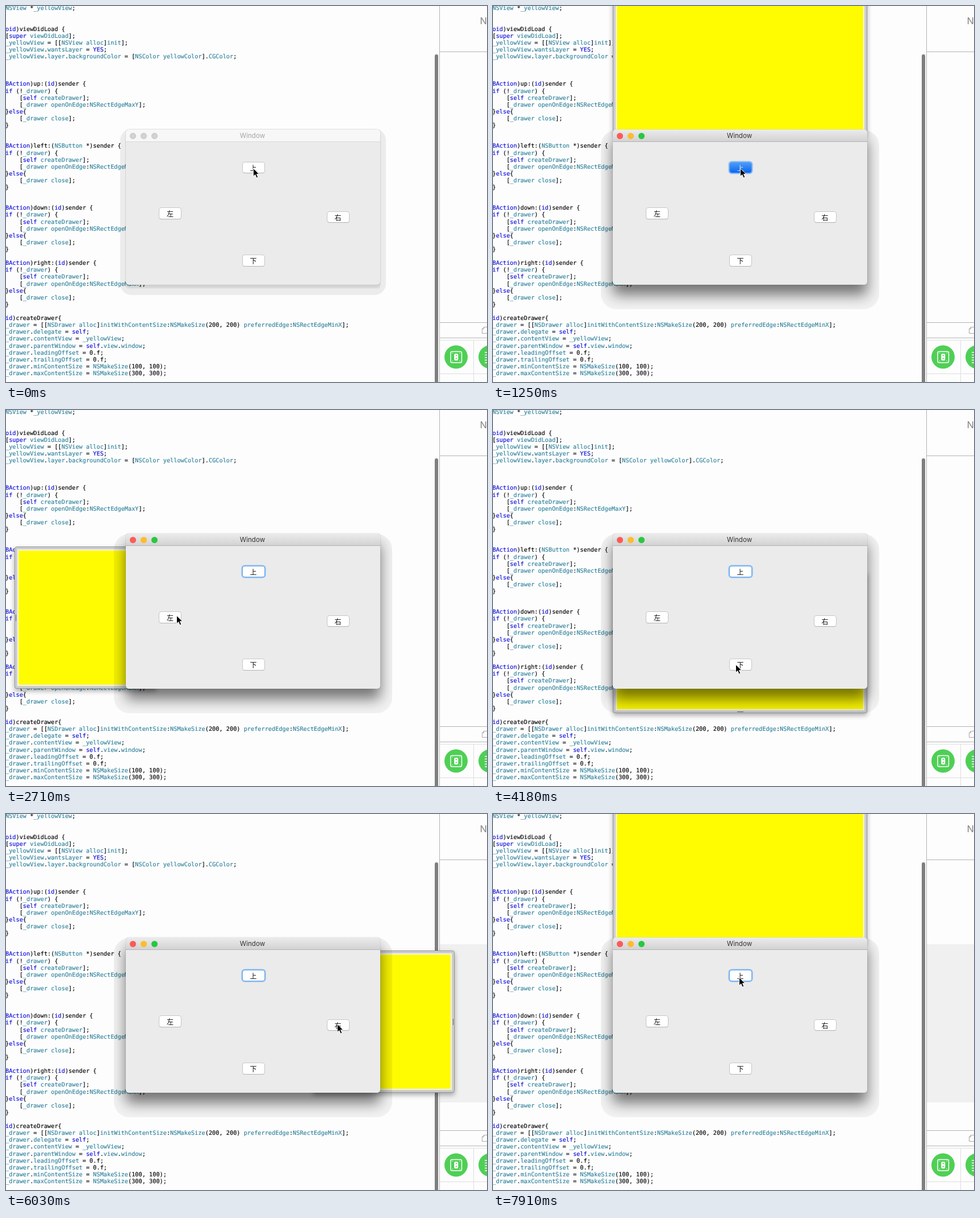
Animation, 847 px wide and 661 px high, one loop 8010 ms. Source, as an HTML page:

```html
<!DOCTYPE html>
<html lang="en">
<head>
<meta charset="utf-8">
<title>Drawer demo</title>
<style>
  html, body { margin: 0; width: 100%; height: 100%; overflow: hidden; background: #fdfdfd; }
  #stage { position: relative; width: 847px; height: 661px; overflow: hidden; }
  #stage div, #stage svg, pre { position: absolute; box-sizing: border-box; }
  pre {
    left: -25.7px; top: -1.8px; margin: 0; color: #000;
    font: 10.25px/12.11px "DejaVu Sans Mono", monospace;
    text-rendering: geometricPrecision; -webkit-text-stroke: .15px;
  }
  .key { color: #0b0bdc; }
  .name { color: #2d809b; }

  #residue { left: 764px; top: 229px; width: 83px; height: 278px; background: #f0f0f0; }

  #drawer {
    border: 1px solid #969696; background: #cdcdcd; border-radius: 4px;
    box-shadow: 0 4px 9px rgba(0, 0, 0, .32);
  }
  #drawer .sheet { inset: 4px; border: 2px solid #f3f3f3; background: #fffb00; }
  #grip { background: #666; }
  .top #grip, .bottom #grip { left: 218px; width: 11px; height: 1px; }
  .left #grip, .right #grip { top: 119px; width: 1px; height: 11px; }
  .top #grip { top: 1px; }
  .bottom #grip { bottom: 1px; }
  .left #grip { left: 1px; }
  .right #grip { right: 1px; }

  #shade {
    left: 190px; top: 218px; width: 490px; height: 315px; overflow: hidden;
    border-radius: 27px; background: rgba(0, 0, 0, .045);
  }
  #shade div {
    left: 21px; top: -1px; width: 448px; height: 273px; border-radius: 5px;
    box-shadow: 0 18px 25px rgba(0, 0, 0, .52);
  }
  .idle #shade { left: 201px; width: 468px; top: 216px; height: 292px; border-radius: 20px; background: #0001; }
  .idle #shade div { left: 10px; top: 1px; box-shadow: 0 6px 3px rgba(0, 0, 0, .1); }

  #window {
    left: 211px; top: 217px; width: 448px; height: 273px; overflow: hidden;
    border-radius: 5px; background: #ebebeb; box-shadow: 0 0 1px rgba(0, 0, 0, .55);
  }
  #bar {
    left: 0; top: 0; width: 448px; height: 22px; border-bottom: 1px solid #b4b4b4;
    background: linear-gradient(#ececec, #d2d2d2); color: #333;
    font: 11.6px/23px Inter, sans-serif; text-align: center; text-indent: -2px;
  }
  .idle #bar { background: #f7f7f7; border-color: #dadada; color: #a5a5a5; }
  .light { top: 6px; width: 11px; height: 11px; border-radius: 50%; }
  .idle .light { background: #d2d2d2 !important; border: 1px solid #c4c4c4; }

  .button {
    width: 38px; height: 18.5px; border-radius: 3.5px; background: #fff; color: #111;
    box-shadow: 0 0 0 .8px #bcbcbc, 0 1px 1px #aaa;
    font: 12px/19px "Noto Sans CJK SC", "Noto Sans CJK", sans-serif; text-align: center;
  }
  .button.focus { box-shadow: 0 0 0 1px #6ba8ee, 0 0 0 2.6px #8fbff3; }
  .idle .button.focus { box-shadow: 0 0 0 .8px #bcbcbc, 0 1px 1px #aaa; }
  #stage .button.down { background: linear-gradient(#4d9df8, #0d66ee); color: #d5e8ff; }
</style>
</head>
<body>
<div id="stage" class="idle">
  <pre id="code"></pre>
  <svg width="847" height="661">
    <rect x="755" y="85" width="6" height="590" rx="3" fill="#7f7f7f"/>
    <path d="M763.5 0V661M764 80.5H847M764 556.5H847M764 583.5H847" fill="none" stroke="#b3b3b3"/>
    <path d="M764 587.5H847M823.5 588V661M764 646.5H847" fill="none" stroke="#dedede"/>
    <text x="834.5" y="32" font-size="16.5" fill="#858585" font-family="Inter, sans-serif">No Selection</text>
    <path d="M847 564.5H841.5L838.5 567.5V575.5H847M841.5 564.5V567.5H838.5" fill="none" stroke="#aaa"/>
    <g fill="#4fcf55"><circle cx="792.5" cy="617" r="20.5"/><circle cx="852.5" cy="617" r="20.5"/></g>
    <g fill="none" stroke="#fff" stroke-width="1.5">
      <rect x="783" y="607.5" width="19.5" height="19.5" rx="2.5"/>
      <rect x="790" y="612" width="5.5" height="10.5" rx="1" fill="#fff"/>
      <path d="M843 609H847M843 613.5H847M843 618H847M843 622.5H847M843 627H847"/>
      <path d="M786 610.5h1M798.5 610.5h1M786 624h1M798.5 624h1"/>
    </g>
    <path d="M792.8 613.5v2M792.8 618.5v2" stroke="#4fcf55" stroke-width="2"/>
  </svg>
  <div id="residue"></div>
  <div id="drawer"><div class="sheet"></div><div id="grip"></div></div>
  <div id="shade"><div></div></div>
  <div id="window">
    <div id="bar">Window</div>
    <div class="light" style="left:7.3px;background:#fc5b57"></div>
    <div class="light" style="left:26px;background:#fdbc2e"></div>
    <div class="light" style="left:44.6px;background:#28c840"></div>
    <div class="button focus" id="up" style="left:205.5px;top:57.8px">上</div>
    <div class="button" id="west" style="left:59px;top:138px">左</div>
    <div class="button" id="east" style="left:354.5px;top:144.5px">右</div>
    <div class="button" id="low" style="left:205.5px;top:221px">下</div>
  </div>
  <svg id="cursor" width="16" height="22" style="left:0;top:0">
    <path d="M1 .5V14.6L4.3 11.5L6.7 17L9.2 16L6.9 10.6H11.3Z" fill="#000" stroke="#fff" stroke-width=".9"/>
  </svg>
</div>
<script>
const LOOP = 8010, TICK = 1000 / 4.8;
const $ = id => document.getElementById(id);

const action = (signature, edge, gap) => `- (IBAction)${signature}sender {
    if (!_drawer) {
        [self createDrawer];
        [_drawer openOnEdge:NSRectEdge${edge}];
    }else{
        [_drawer close];
    }
${"\n".repeat(gap)}`;

const source = `    NSView *_yellowView;


- (void)viewDidLoad {
    [super viewDidLoad];
    _yellowView = [[NSView alloc]init];
    _yellowView.wantsLayer = YES;
    _yellowView.layer.backgroundColor = [NSColor yellowColor].CGColor;



${action("up:(id)", "MaxY", 2)}${action("left:(NSButton *)", "MinX", 2)}${
action("down:(id)", "MinY", 1)}${action("right:(id)", "MaxX", 1)}-(void)createDrawer{
    _drawer = [[NSDrawer alloc]initWithContentSize:NSMakeSize(200, 200) preferredEdge:NSRectEdgeMinX];
    _drawer.delegate = self;
    _drawer.contentView = _yellowView;
    _drawer.parentWindow = self.view.window;
    _drawer.leadingOffset = 0.f;
    _drawer.trailingOffset = 0.f;
    _drawer.minContentSize = NSMakeSize(100, 100);
    _drawer.maxContentSize = NSMakeSize(300, 300);`;

const keywords = /^(void|id|IBAction|if|else|self|super|YES)$/;
const paint = line => line.replace(/\d[\w.]*|[A-Za-z_]\w*/g, word => {
  if (keywords.test(word)) return `<span class="key">${word}</span>`;
  const plain = /^\d/.test(word) || (line[0] === "-" && !word.startsWith("NS"));
  return plain ? word : `<span class="name">${word}</span>`;
});
$("code").innerHTML = source.split("\n").map(paint).join("\n");

// Tracks hold [tick, ...values] and are linear in between.
const pointer = [[0, 435, 285], [7, 435, 285], [8, 428, 300], [10, 355, 362], [11, 303, 362],
  [12, 300, 361], [17, 300, 361], [19, 427, 447], [23, 427, 447], [25, 533, 406],
  [26, 583, 369], [32, 583, 369], [33, 541, 349], [35, 433, 287], [39, 433, 287]];
const reach = [[0, 0], [1, 0], [4, 240], [6, 240], [9, 0], [11, 0], [13, 196], [15, 196], [18, 0],
  [19, 0], [20, 43], [22, 200], [23, 200], [25, 12], [26, 0], [27, 0], [30, 196], [31, 196],
  [33, 18.5], [34, 0], [36, 0], [38, 240], [39, 240]];
const presses = { up: [1, 6, 36], west: [11, 15], low: [19, 23], east: [27, 32] };

function sample(track, tick) {
  const i = track.findIndex(key => key[0] > tick);
  const a = track[i - 1], b = track[i];
  const k = (tick - a[0]) / (b[0] - a[0]);
  return a.slice(1).map((v, j) => v + (b[j + 1] - v) * k);
}

const places = {
  top: d => [211, 217 - d, 448],
  left: d => [211 - d, 240, 250],
  bottom: d => [211, 240 + d, 448],
  right: d => [409 + d, 240, 250]
};
const sideAt = tick =>
  tick < 10 ? "top" : tick < 19 ? "left" : tick < 27 ? "bottom" : tick < 35 ? "right" : "top";

function draw(tick) {
  const [x, y] = sample(pointer, tick), [out] = sample(reach, tick);
  const side = sideAt(tick), [left, top, width] = places[side](out);
  const drawer = $("drawer");
  drawer.className = side;
  drawer.style.cssText =
    `left:${left}px;top:${top}px;width:${width}px;height:250px;display:${out ? "block" : "none"}`;
  $("cursor").style.transform = `translate(${x - 0.5}px,${y}px)`;
  $("stage").className = tick < 1 ? "idle" : "";
  $("residue").style.display = tick < 29 ? "none" : "block";
  for (const id in presses) $(id).classList.toggle("down", presses[id].includes(tick));
}

let shown = -1;
const start = performance.now();
function frame() {
  const tick = Math.floor(((performance.now() - start) % LOOP + 11) / TICK);
  if (tick !== shown) draw(shown = tick);
  requestAnimationFrame(frame);
}
frame();
</script>
</body>
</html>
```
